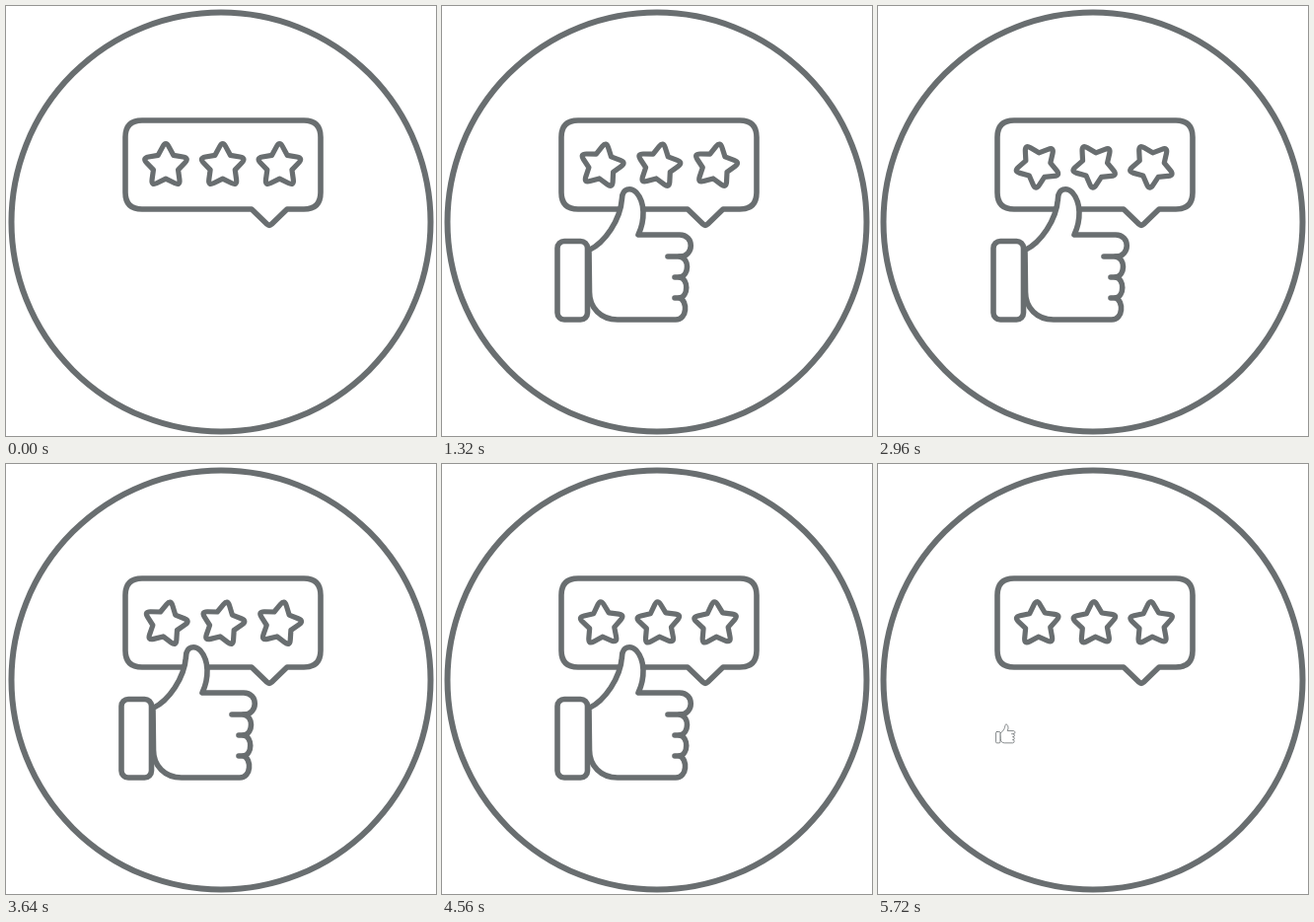
An HTML page for the animation above (5.76 s loop, 436x436 px).

```html
<!DOCTYPE html>
<html lang="en">
<head>
<meta charset="utf-8">
<title>Review</title>
<style>
  html, body { margin: 0; width: 100%; height: 100%; overflow: hidden; background: #fff; }
  svg { display: block; width: 100%; height: 100%; }
</style>
</head>
<body>
<svg viewBox="0 0 436 436" fill="#fff" stroke="#696e70" stroke-width="5.6" stroke-linecap="round" stroke-linejoin="round">
  <circle cx="218" cy="219" r="212.5" stroke-width="6"/>
  <path d="M138 116H302Q319 116 319 133V189Q319 206 302 206H285L269.5 221Q267 223.400 264.500 221L249 206H138Q121 206 121 189V133Q121 116 138 116Z"/>
  <g id="stars" stroke-width="5.2"></g>
  <g id="thumb">
    <path d="M149 247.500C165 240 181 217 182.500 195C183 185 191 183.500 197 189C206 199 206 217 199 232H241C256 232 256 254 241 254C251 256 251 273 241 275C250 277 250 294 241 296C249 299 249 318 237 318H178C161 318 149.500 306 149.500 290Z"/>
    <path d="M229 254H241M236 275H241M236 296H241" fill="none"/>
    <rect x="117" y="238.500" width="30.500" height="79.500" rx="7"/>
  </g>
</svg>
<script>
const LOOP = 5760, STEP = 40, GROW = 660, SHRINK = 280;
const STAR_XS = [162, 219.7, 277.4], STAR_Y = 162;
const PIVOT = { x: 120, y: 277 };
const thumb = document.getElementById('thumb');

const polar = (radius, degrees) => {
  const a = degrees * Math.PI / 180;
  return [radius * Math.sin(a), -radius * Math.cos(a)];
};
const mix = (a, b, k) => a.map((v, i) => v + (b[i] - v) * k);
const fmt = p => p.map(v => v.toFixed(2)).join(' ');

// Five-pointed star with rounded tips.
function starPath(outer, inner, rounding) {
  let d = '';
  for (let i = 0; i < 5; i++) {
    const tip = polar(outer, i * 72);
    const before = polar(inner, i * 72 - 36);
    const after = polar(inner, i * 72 + 36);
    d += `${i ? 'L' : 'M'}${fmt(before)}L${fmt(mix(before, tip, rounding))}` +
         `Q${fmt(tip)} ${fmt(mix(after, tip, rounding))}`;
  }
  return d + 'Z';
}

const stars = STAR_XS.map(() => {
  const star = document.createElementNS('http://www.w3.org/2000/svg', 'path');
  star.setAttribute('d', starPath(25.2, 13.2, 0.6));
  document.getElementById('stars').append(star);
  return star;
});

function easeOutBack(k) {
  const s = 1.70158, u = k - 1;
  return 1 + (s + 1) * u ** 3 + s * u ** 2;
}

function thumbScale(t) {
  if (t < GROW) return easeOutBack(t / GROW);
  return Math.min(1, (LOOP - t) / SHRINK);
}

function render(time) {
  const t = Math.floor((time % LOOP) / STEP) * STEP;
  const angle = 360 * t / LOOP;
  stars.forEach((star, i) =>
    star.setAttribute('transform', `translate(${STAR_XS[i]} ${STAR_Y}) rotate(${angle})`));

  const scale = thumbScale(t);
  thumb.style.display = scale > 0.001 ? '' : 'none';
  thumb.setAttribute('transform',
    `translate(${PIVOT.x} ${PIVOT.y}) scale(${scale}) translate(${-PIVOT.x} ${-PIVOT.y})`);
}

const start = performance.now();
function tick() {
  render(performance.now() - start);
  requestAnimationFrame(tick);
}
tick();
</script>
</body>
</html>
```
